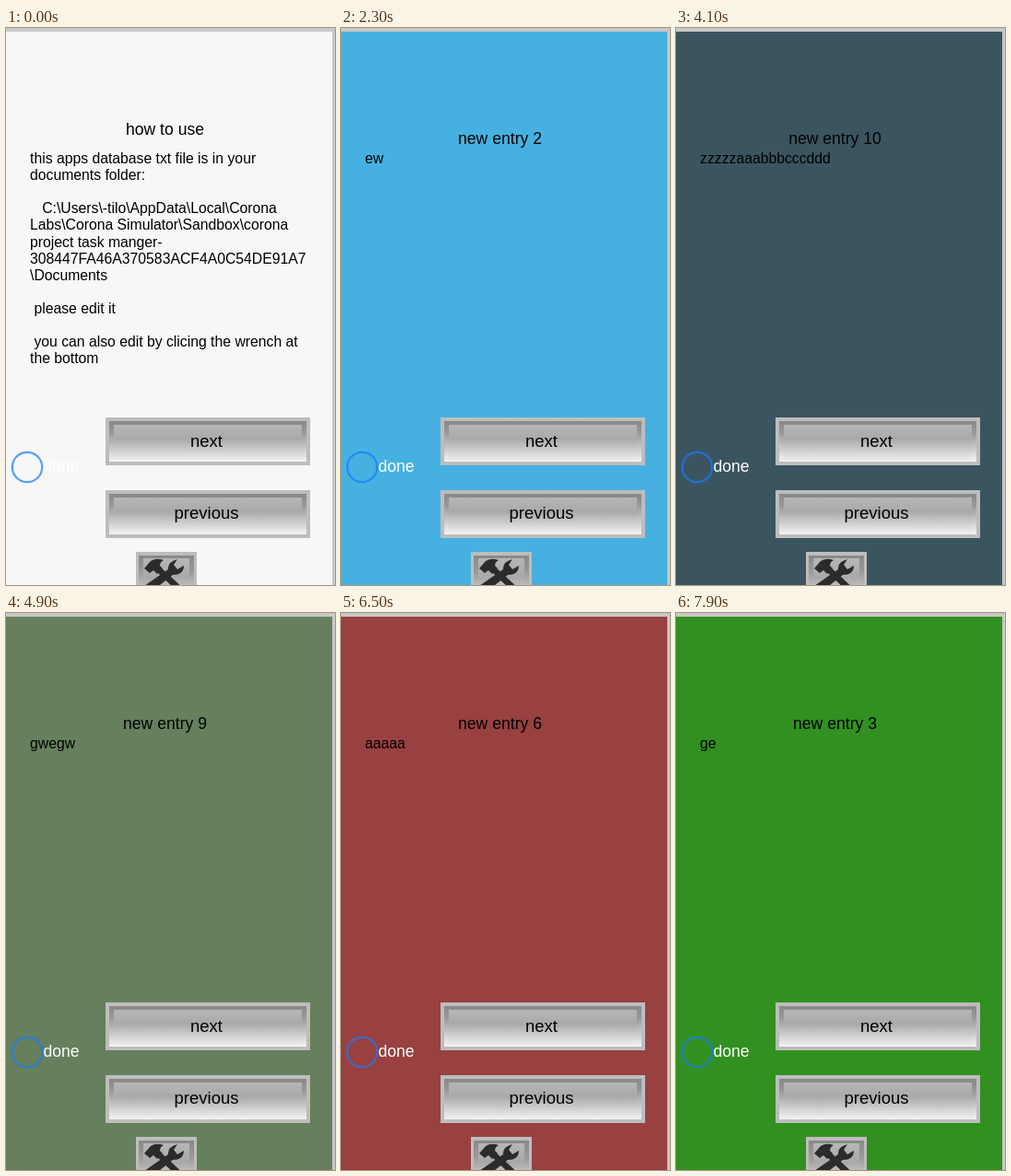
Animation of 357 by 605 pixels, one loop 8 s. Source, as an HTML page:

```html
<!DOCTYPE html>
<html lang="en">
<head>
<meta charset="utf-8">
<title>Task pages</title>
<style>
html, body { margin: 0; width: 100%; height: 100%; overflow: hidden; background: #c8c8c8; }
svg { display: block; width: 357px; height: 605px; font-family: "Liberation Sans", Arial, sans-serif; }
text { white-space: pre; }
.title { font-size: 17.6px; text-anchor: middle; }
.body { font-size: 15.75px; }
.label { font-size: 18.5px; text-anchor: middle; }
</style>
</head>
<body>
<svg viewBox="0 0 357 605">
  <defs>
    <linearGradient id="bevel" x2="0" y2="1">
      <stop offset="0" stop-color="#888"/>
      <stop offset=".3" stop-color="#999"/>
      <stop offset="1" stop-color="#f4f4f4"/>
    </linearGradient>
    <linearGradient id="face" x2="0" y2="1">
      <stop offset="0" stop-color="#b6b6b6"/>
      <stop offset=".4" stop-color="#a9a9a9"/>
      <stop offset="1" stop-color="#ececec"/>
    </linearGradient>
    <g id="button">
      <rect width="222" height="52" fill="#bdbdbd"/>
      <rect x="4" y="4" width="214" height="44" fill="url(#bevel)"/>
      <rect x="9" y="8" width="204" height="38" fill="url(#face)"/>
    </g>
  </defs>
  <rect width="357" height="605" fill="#c8c8c8"/>
  <rect id="page" y="4" width="354" height="601"/>
  <text id="title" class="title" x="172.5"></text>
  <g id="body" class="body"></g>

  <circle id="ring" cx="23" cy="477" r="16.2" stroke="#167cff" stroke-opacity=".72" stroke-width="2.2"/>
  <text x="40.5" y="482" font-size="17.6" fill="#fff">done</text>

  <use href="#button" x="108" y="423"/>
  <text class="label" x="217.5" y="455">next</text>
  <use href="#button" x="108" y="502"/>
  <text class="label" x="217.5" y="533">previous</text>

  <rect x="141" y="569" width="66" height="66" fill="#bdbdbd"/>
  <rect x="144" y="573" width="60" height="58" fill="url(#bevel)"/>
  <rect x="149" y="576" width="50" height="52" fill="url(#face)"/>
  <g fill="#2b2b2b">
    <path d="M150 587 L157 579 Q163 575 171 578 Q167 580 167 584 L170 587 L164 593 L160 589 L156 592 Z"/>
    <path d="M163 590 L168 586 L194 610 L188 614 Z"/>
    <path d="M150 606 L176 588 Q175 580 186 577 L182 583 L186 588 L193 584 Q193 594 181 594 L157 613 Z"/>
  </g>
</svg>
<script>
const LOOP = 8000, STEP = 100;
const FADE = [.4, .65, .85, 1];
const HELP = `this apps database txt file is in your
documents folder:

   C:\\Users\\-tilo\\AppData\\Local\\Corona
Labs\\Corona Simulator\\Sandbox\\corona
project task manger-
308447FA46A370583ACF4A0C54DE91A7
\\Documents

 please edit it

 you can also edit by clicing the wrench at
the bottom`;

const help = start => ({ start, title: "how to use", y: 115.5, text: HELP, rgb: [247, 247, 247] });
const entry = (start, n, text, ...rgb) => ({ start, title: "new entry " + n, y: 126, text, rgb });

const pages = [
  help(-1000),
  entry(2000, 2, "ew", 70, 177, 225),
  help(3300),
  entry(4100, 10, "zzzzzaaabbbcccddd", 147, 212, 240),
  entry(4700, 9, "gwegw", 120, 150, 110),
  entry(5300, 8, "gwsgw", 168, 62, 100),
  entry(5900, 7, "gweg", 110, 120, 170),
  entry(6400, 6, "aaaaa", 235, 98, 98),
  entry(6800, 5, "gwe", 140, 110, 150),
  entry(7300, 4, "gews", 212, 110, 172),
  entry(7800, 3, "ge", 75, 221, 49)
];
const ticked = [[900, 1200], [2600, 3300]];

const $ = id => document.getElementById(id);
const [page, title, body, ring] = ["page", "title", "body", "ring"].map($);
let shown;

function write(p) {
  title.textContent = p.title;
  title.setAttribute("y", p.y);
  body.replaceChildren(...p.text.split("\n").map((line, i) => {
    const el = document.createElementNS("http://www.w3.org/2000/svg", "text");
    el.setAttribute("x", 26);
    el.setAttribute("y", 147 + i * 18.1);
    el.textContent = line;
    return el;
  }));
}

function draw(now) {
  const t = now % LOOP;
  const p = pages.findLast(q => q.start <= t);
  if (p !== shown) write(shown = p);
  const level = FADE[Math.min(3, Math.floor((t - p.start) / STEP))];
  page.setAttribute("fill", `rgb(${p.rgb.map(c => Math.round(c * level))})`);
  const on = ticked.some(([from, to]) => t >= from && t < to);
  ring.setAttribute("fill", on ? "#167cffb8" : "none");
}

function tick() {
  draw(performance.now());
  requestAnimationFrame(tick);
}
tick();
</script>
</body>
</html>
```
